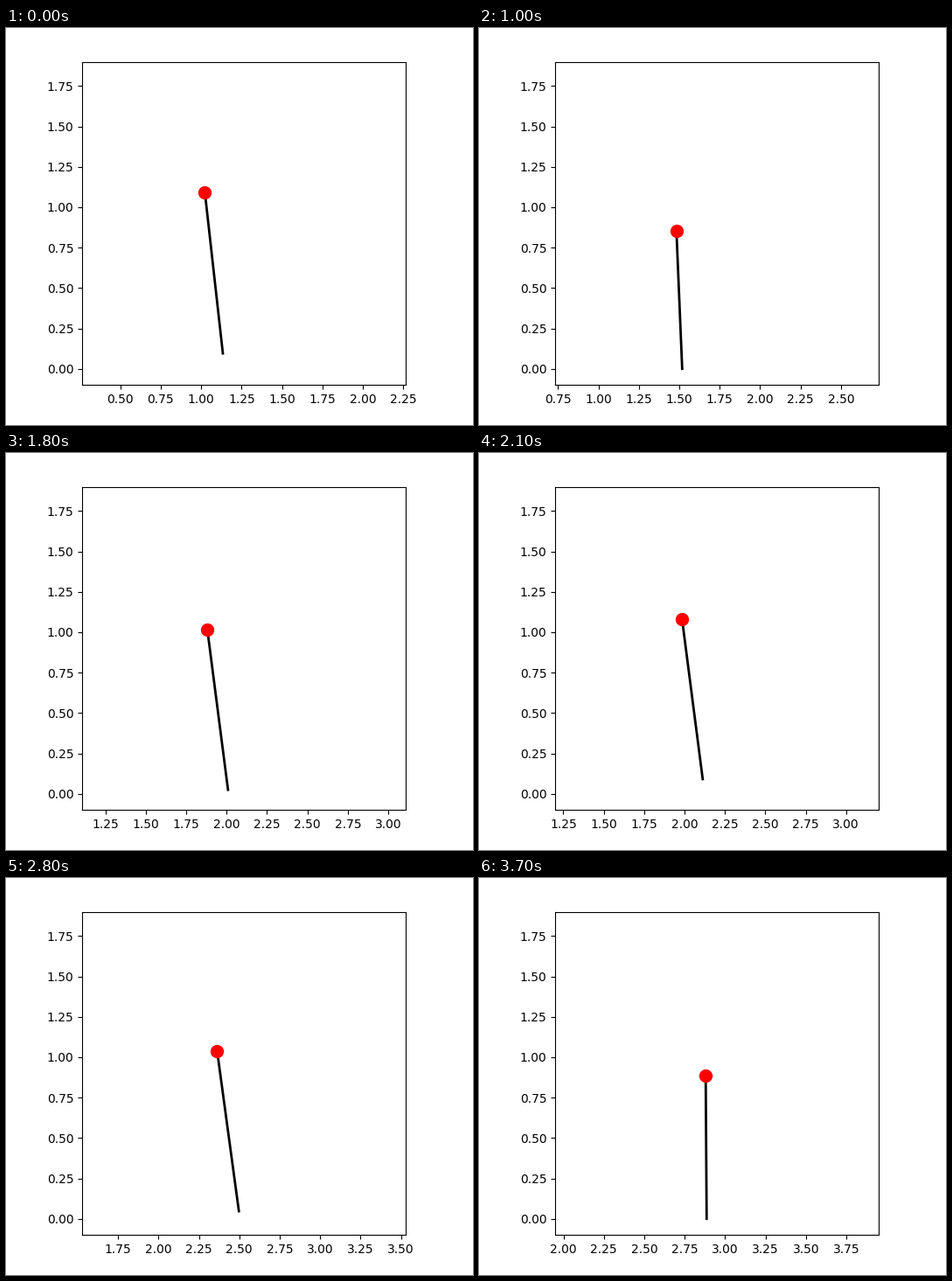
A matplotlib script for the animation above (3.9 s loop, 534 by 454 pixels).

```python
import math
import matplotlib.pyplot as plt
from matplotlib.animation import FuncAnimation

W, H, DPI = 534, 454, 100
FRAMES, INTERVAL = 39, 100

STEP = 0.0468            # view travel per tick
VIEW_START = 0.2645
HOLDS = {1, 5, 17, 30, 38}   # frames that linger on the previous tick

FIRST_APEX, PERIOD = 0.0185, 0.297
TOP = 1.095              # body height at the apex
LEG = 1.0
FALL = 17.5              # drop per squared travel in flight
PHASE = 1.9              # half angle of the spring stroke


def clock(i):
    late = (i >= 20) + (i in HOLDS)
    return (i - late) * STEP


def body_x(t):
    """The body gains speed steadily while the view moves evenly."""
    return VIEW_START + 0.759 + 0.9335 * t + 0.1 * t * t


def reach(hop):
    """Forward offset of the foot, easing up as the hopper speeds up."""
    return 0.124 - 0.013 * math.cos(math.pi * hop / 5)


def pose(t):
    """Body and foot positions at moment t."""
    x = body_x(t)
    hop = math.floor((t - FIRST_APEX) / PERIOD + 0.5)
    since = t - FIRST_APEX - hop * PERIOD
    rise = math.sqrt((TOP - LEG) / FALL)
    if since < -rise:            # still on the ground from the last hop
        hop -= 1
        since += PERIOD

    leg_y = math.sqrt(LEG ** 2 - reach(hop) ** 2)
    drop = math.sqrt((TOP - leg_y) / FALL)
    if since <= drop:
        y = TOP - FALL * since ** 2
        return x, y, x + reach(hop), y - leg_y

    # Stance: fixed foot, the spring leg shortens and pushes off again
    half = (PERIOD - rise - drop) / 2
    u = (since - drop) / half - 1
    size = 2 * FALL * drop * half / (PHASE * math.sin(PHASE))
    base = leg_y + (LEG - leg_y) * (u + 1) / 2
    y = base - size * (math.cos(PHASE * u) - math.cos(PHASE))
    landing = FIRST_APEX + hop * PERIOD + drop
    return x, y, body_x(landing) + reach(hop), 0.0


fig = plt.figure(figsize=(W / DPI, H / DPI), dpi=DPI, facecolor="white")
ax = fig.add_axes([87.2 / W, 45.8 / H, 369.6 / W, 369.6 / H])
ax.set_ylim(-0.1, 1.9)
leg, = ax.plot([], [], color="black", lw=2)
body, = ax.plot([], [], "ro", ms=10)


def update(i):
    t = clock(i)
    x, y, foot_x, foot_y = pose(t)
    leg.set_data([x, foot_x], [y, foot_y])
    body.set_data([x], [y])
    ax.set_xlim(VIEW_START + t, VIEW_START + t + 2)
    return leg, body


anim = FuncAnimation(fig, update, frames=FRAMES, init_func=lambda: update(0),
                     interval=INTERVAL, repeat=True, blit=False)
plt.show()
```
